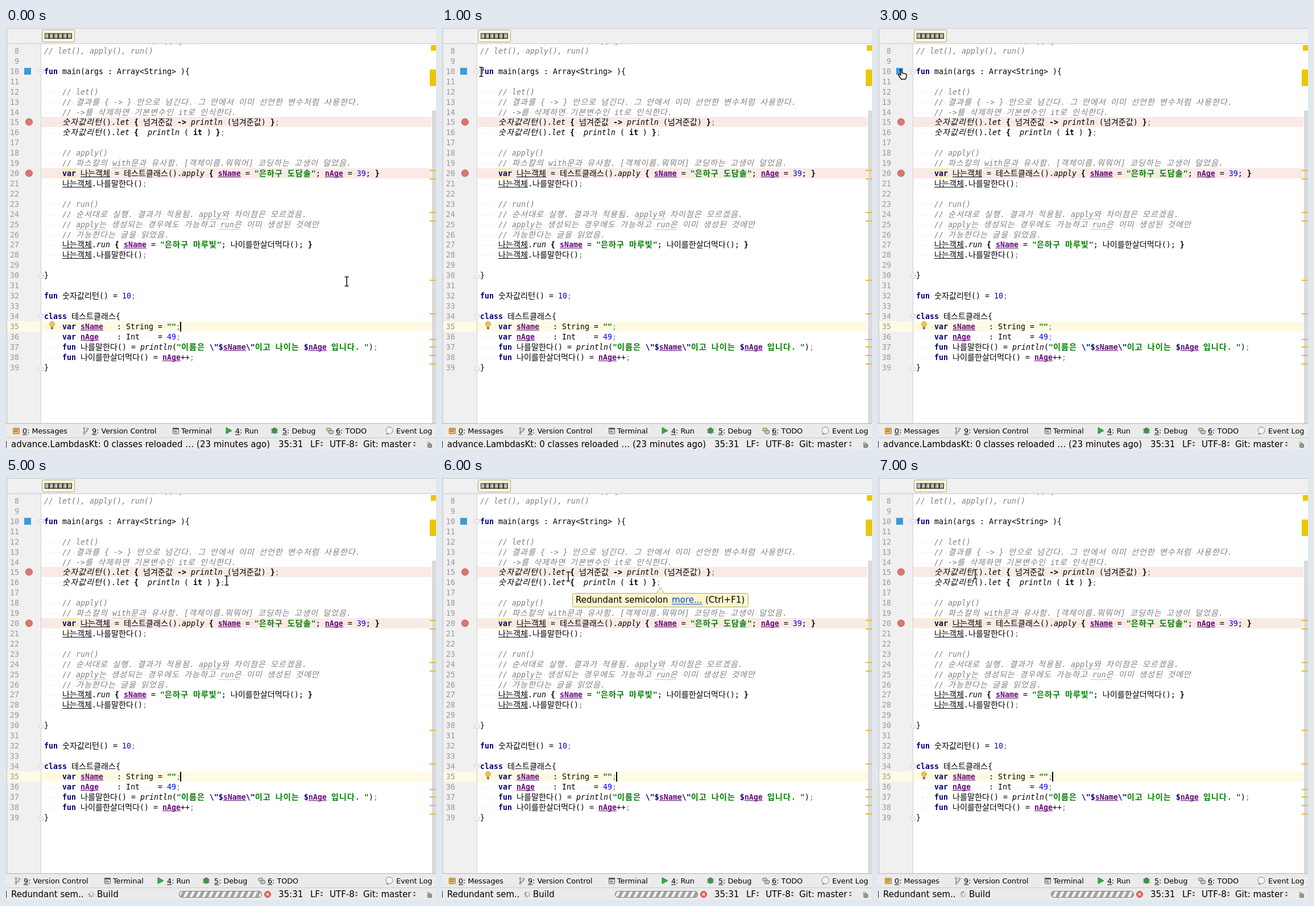
An HTML page with a canvas for the animation above (8 s loop, 756 by 741 pixels).

```html
<!DOCTYPE html>
<html lang="ko">
<head>
<meta charset="utf-8">
<style>
html, body { margin: 0; width: 100%; height: 100%; overflow: hidden; background: #fff; }
canvas { display: block; }
</style>
</head>
<body>
<canvas id="stage" width="756" height="741"></canvas>
<script>
const ctx = document.getElementById('stage').getContext('2d');
const UI = '"DejaVu Sans", sans-serif';
const MONO = '13.29px "DejaVu Sans Mono", monospace';
const HANGUL = '14.13px "Noto Sans CJK KR", "Noto Sans CJK", "Noto Sans CJK JP", sans-serif';

// style key: [colour, font style, underlined]
const STYLES = {
  p: ['#000', ''], k: ['#000080', 'bold'], b: ['#000', 'bold'], c: ['#808080', 'italic'],
  i: ['#000', 'italic'], s: ['#008000', 'bold'], v: ['#660e7a', 'bold', true],
  u: ['#000', '', true], n: ['#0000ff', ''], g: ['#808080', '']
};

// Runs are separated by "|"; the first letter of each run is its style.
const CODE = {
  7: 'c// 함수형 표현 (기본 정리), apply(1)',
  8: 'c// let(), apply(), run()',
  10: 'kfun|p main(args : Array<String> ){',
  12: 'p    |c// let()',
  13: 'p    |c// 결과를 { -> } 안으로 넘긴다. 그 안에서 이미 선언한 변수처럼 사용한다.',
  14: 'p    |c// ->를 삭제하면 기본변수인 it로 인식한다.',
  15: 'p    |i숫자값리턴|p().|ilet |b{ |p넘겨준값 |b-> |iprintln |p(넘겨준값) |b}|g;',
  16: 'p    |i숫자값리턴|p().|ilet |b{  |iprintln |p( |bit|p ) |b}|g;',
  18: 'p    |c// apply()',
  19: 'p    |c// 파스칼의 with문과 유사함. [객체이름.뭐뭐머] 코딩하는 고생이 덜었음.',
  20: 'p    |kvar|p |u나는객체|p = 테스트클래스().|iapply |b{ |vsName|p = |s"은하구 도담솔"|p; |vnAge|p = |n39|p; |b}',
  21: 'p    |u나는객체|p.나를말한다()|g;',
  23: 'p    |c// run()',
  24: 'p    |c// 순서대로 실행. 결과가 적용됨. apply와 차이점은 모르겠음.',
  25: 'p    |c// apply는 생성되는 경우에도 가능하고 run은 이미 생성된 것에만',
  26: 'p    |c// 가능한다는 글을 읽었음.',
  27: 'p    |u나는객체|p.|irun |b{ |vsName|p = |s"은하구 마루빛"|p; 나이를한살더먹다(); |b}',
  28: 'p    |u나는객체|p.나를말한다()|g;',
  30: 'p}',
  32: 'kfun|p 숫자값리턴() = |n10|g;',
  34: 'kclass|p 테스트클래스{',
  35: 'p    |kvar|p |vsName|p   : String = |s""|g;',
  36: 'p    |kvar|p |vnAge|p    : Int    = |n49|g;',
  37: 'p    |kfun|p 나를말한다() = |iprintln|p(|s"이름은 |k\\"$|vsName|k\\"|s이고 나이는 |k$|vnAge|s 입니다. "|p)|g;',
  38: 'p    |kfun|p 나이를한살더먹다() = |vnAge|p++|g;',
  39: 'p}'
};

const baseline = n => Math.round(45 + 17.92 * (n - 8));

function rect(x, y, w, h, fill) {
  ctx.fillStyle = fill;
  ctx.fillRect(x, y, w, h);
}

function path(points, fill, stroke, width = 1) {
  ctx.beginPath();
  points.forEach(([x, y]) => ctx.lineTo(x, y));
  ctx.closePath();
  paint(fill, stroke, width);
}

function paint(fill, stroke, width = 1) {
  if (fill) { ctx.fillStyle = fill; ctx.fill(); }
  if (stroke) { ctx.strokeStyle = stroke; ctx.lineWidth = width; ctx.stroke(); }
}

function circle(x, y, r, fill, stroke, width) {
  ctx.beginPath();
  ctx.arc(x, y, r, 0, 7);
  paint(fill, stroke, width);
}

function box(x, y, w, h, r, fill, stroke) {
  ctx.beginPath();
  ctx.roundRect(x + .5, y + .5, w - 1, h - 1, r);
  paint(fill, stroke);
}

// UI label; mnemonic is the index of an underlined letter.
function label(str, x, y, size = 15, color = '#000', mnemonic = -1) {
  ctx.font = `${size}px ${UI}`;
  ctx.fillStyle = color;
  ctx.fillText(str, x, y);
  if (mnemonic >= 0) {
    const from = ctx.measureText(str.slice(0, mnemonic)).width;
    rect(x + from, y + 1.5, ctx.measureText(str[mnemonic]).width, 1, color);
  }
}

function codeLine(n) {
  const y = baseline(n);
  let x = 67;
  for (const run of CODE[n].split('|')) {
    const [color, style, underlined] = STYLES[run[0]];
    const start = x;
    for (const part of run.slice(1).match(/[가-힣]+|[^가-힣]+/g)) {
      const hangul = /[가-힣]/.test(part);
      ctx.font = `${style} ${hangul ? HANGUL : MONO}`;
      // Bold and slanted Hangul runs one pixel wider per syllable.
      ctx.letterSpacing = hangul && style ? '1px' : '0px';
      ctx.fillStyle = color;
      ctx.fillText(part, x, y);
      if (!hangul) [...part].forEach((ch, i) => {
        if (ch === ' ') rect(Math.round(x + i * 8 + 3), y - 4, 1, 1, '#bdbdbd');
      });
      x += ctx.measureText(part).width;
    }
    if (underlined) rect(start, y + 1, x - start, 1, color);
  }
  ctx.letterSpacing = '0px';
}

function squiggle(x, n, width) {
  ctx.beginPath();
  for (let i = 0; i <= width; i += 2) ctx.lineTo(x + i, baseline(n) + 3 + i / 2 % 2 * 1.5);
  paint(null, '#b5c9a8');
}

function foldMark(n, end) {
  const y = baseline(n) - 4, d = end ? -1 : 1;
  path([[57.5, y - 4 * d], [65.5, y - 4 * d], [65.5, y + d], [61.5, y + 5 * d], [57.5, y + d]], '#fff', '#c4c4c4');
  rect(59.5, y - .5, 4, 1, '#b0b0b0');
}

function playIcon(x, y) {
  path([[x - 4, y - 5.5], [x + 6, y], [x - 4, y + 5.5]], '#2faa4a', '#24913c');
}

function bugIcon(x, y) {
  for (const dy of [-3, 0, 3]) rect(x - 6, y + dy, 12, 1, '#34703c');
  ctx.beginPath();
  ctx.ellipse(x, y, 4, 5, 0, 0, 7);
  paint('#3b9a48', '#2b6c36');
}

function editor(caretOn, bulbOn) {
  rect(0, 0, 756, 741, '#fff');
  rect(0, 28, 61, 667, '#f0f0f0');
  for (const n of [15, 20]) rect(62, baseline(n) - 14, 686, 18, '#faeae6');
  rect(2, 515, 746, 18, '#fffae3');
  rect(99, 246, 24, 18, '#f6ebbc');
  rect(61, 28, 1, 667, '#d0d0d0');
  Object.keys(CODE).forEach(n => codeLine(+n));
  squiggle(187, 19, 60);
  squiggle(338, 24, 54);
  squiggle(123, 25, 54);
  squiggle(374, 25, 38);

  ctx.textAlign = 'right';
  ctx.font = MONO;
  ctx.fillStyle = '#999';
  for (let n = 8; n < 40; n++) ctx.fillText(n, 23, baseline(n));
  ctx.textAlign = 'left';
  foldMark(10);
  foldMark(34);
  foldMark(30, true);
  foldMark(39, true);
  rect(32, 70, 12, 12, '#3b9bdc');
  for (const y of [165, 255]) circle(40.5, y, 6, '#db776f', '#bd5d57');
  if (bulbOn) {
    circle(81, 520, 4.5, '#f6bd4f', '#dba03a');
    rect(79, 525, 4, 4, '#777');
  }
  if (caretOn) rect(306, 516, 2, 17, '#000');

  rect(749, 145, 7, 550, '#dadada');
  rect(747, 30, 9, 10, '#ebc700');
  rect(745, 73, 11, 29, '#ebc700');
  for (const y of [250, 265, 324, 339, 443, 502, 547, 560, 575, 590]) rect(745, y - 1, 11, 2, '#e3bb35');
}

function topBar() {
  rect(0, 0, 756, 28, '#f0f0f0');
  rect(0, 0, 756, 1, '#c4c4c4');
  rect(0, 27, 756, 1, '#c8c8c8');
  box(63, 3, 58, 22, 2, '#fbf8dc', '#a8a38a');
  for (let x = 68; x < 116; x += 8) {
    ctx.strokeStyle = '#222';
    ctx.lineWidth = 1;
    ctx.strokeRect(x + .5, 9.5, 7, 9);
    for (const dx of [2, 5]) for (const dy of [11, 15]) rect(x + dx, dy, 1.5, 2.5, '#333');
  }
}

function toolBar(withMessages) {
  rect(0, 694, 756, 47, '#ebebeb');
  rect(0, 694, 756, 1, '#b4b4b4');
  rect(0, 719, 756, 1, '#c9c9c9');
  const item = (str, x, mnemonic = 0) => label(str, x, 712, 12.75, '#000', mnemonic);
  ctx.save();
  if (withMessages) {
    box(12, 702, 12, 11, 1, '#e8b86a', '#a87b3c');
    rect(14, 705, 8, 1, '#805a28');
    rect(14, 708, 6, 1, '#805a28');
    item('0: Messages', 29);
  } else ctx.translate(-120, 0);
  ctx.beginPath();
  ctx.moveTo(137.5, 704); ctx.lineTo(137.5, 712);
  ctx.moveTo(137.5, 710); ctx.quadraticCurveTo(143.5, 709, 143.5, 704);
  paint(null, '#557a9e', 1.3);
  for (const [x, y] of [[137.5, 703], [137.5, 712], [143.5, 704]]) circle(x, y, 1.6, '#f0f0f0', '#557a9e');
  item('9: Version Control', 151);
  box(293, 702, 11, 11, 1, '#e4e4e4', '#555');
  rect(293, 702, 11, 3, '#555');
  rect(295, 707, 5, 1, '#555');
  rect(295, 709, 6, 1, '#555');
  item('Terminal', 308, -1);
  playIcon(391, 707);
  item('4: Run', 403);
  bugIcon(472, 707);
  item('5: Debug', 486);
  box(563, 702, 9, 6, 2, '#e5c590', '#806a48');
  box(567, 706, 9, 7, 2, '#b9c8d8', '#506478');
  item('6: TODO', 580);
  ctx.restore();
  circle(674, 706.5, 6, '#f4f4f4', '#858585');
  path([[670, 711], [668, 714], [674, 713]], '#858585');
  item('Event Log', 686, -1);
}

function arrows(x) {
  path([[x - 2.5, 729], [x, 726], [x + 2.5, 729]], '#555');
  path([[x - 2.5, 732], [x, 735], [x + 2.5, 732]], '#555');
}

function statusBar(building, step) {
  rect(0, 725, 1, 12, '#222');
  if (building) {
    label('Redundant sem..', 9, 736);
    for (let i = 0; i < 8; i++) {
      const a = (i + step) * Math.PI / 4, c = Math.cos(a), s = Math.sin(a);
      ctx.beginPath();
      ctx.moveTo(150 + 2.5 * c, 731 + 2.5 * s);
      ctx.lineTo(150 + 5.5 * c, 731 + 5.5 * s);
      paint(null, `rgb(0 0 0 / ${.12 + i * .08})`, 1.4);
    }
    label('Build', 160, 736);
    ctx.save();
    box(304, 725, 146, 12, 6, '#f4f4f4', '#888');
    ctx.clip();
    for (let x = 290 + step * 3 % 11; x < 456; x += 11)
      path([[x, 737], [x + 6, 737], [x + 12, 725], [x + 6, 725]], '#a3a3a3');
    ctx.restore();
    box(304, 725, 146, 12, 6, null, '#888');
    circle(460, 731, 5.5, '#e2665c', '#c84f47');
    ctx.beginPath();
    ctx.moveTo(458, 729); ctx.lineTo(462, 733);
    ctx.moveTo(462, 729); ctx.lineTo(458, 733);
    paint(null, '#fff', 1.4);
  } else label('advance.LambdasKt: 0 classes reloaded … (23 minutes ago)', 9, 736);
  label('35:31', 479, 736);
  label('LF', 535, 736);
  arrows(555);
  label('UTF-8', 569, 736);
  arrows(616);
  label('Git: master', 628, 736);
  arrows(718);
  box(741, 730, 8, 7, 1, '#8fa58f', '#666');
  ctx.beginPath();
  ctx.arc(743, 730, 2.5, Math.PI, 0);
  paint(null, '#666');
}

function popup() {
  ctx.save();
  ctx.shadowColor = 'rgba(0,0,0,.45)';
  ctx.shadowBlur = 22;
  ctx.shadowOffsetY = 5;
  rect(41, 76, 396, 70, '#eff0f1');
  ctx.restore();
  box(41, 76, 396, 70, 0, null, '#c6c8ca');
  rect(41, 100, 396, 22, '#3875d7');
  playIcon(51, 88);
  bugIcon(51, 111);
  playIcon(53, 133);
  for (let i = 0; i < 18; i++) if ((i + (i / 3 | 0)) % 2) rect(45 + i % 3 * 2, 127 + (i / 3 | 0) * 2, 2, 2, '#777');
  const run = "Run 'advance.Newstyle_fun...'";
  label(run, 65, 93, 15, '#000', 1);
  label('Ctrl+Shift+F10', 327, 92, 12.75, '#5c5c5c');
  label("Debug 'advance.Newstyle_fun...'", 65, 115, 15, '#fff', 0);
  label(run + ' with Coverage', 65, 138, 15, '#000', run.length + 9);
}

function tooltip() {
  const fill = '#fbf6cb', edge = '#aaa580';
  box(229, 202, 310, 25, 3, fill, edge);
  path([[377, 203], [384, 192], [391, 203]], fill, edge);
  rect(377, 203, 15, 2, fill);
  label('Redundant semicolon', 235, 219);
  label('more...', 404, 219, 15, '#0645e0');
  rect(404, 221, 54, 1, '#0645e0');
  label('(Ctrl+F1)', 463, 219);
}

function iBeam(x, y) {
  for (const [color, width] of [['#fff', 3.5], ['#1a1a1a', 1.6]]) {
    ctx.beginPath();
    ctx.moveTo(x - 3.5, y - 8); ctx.lineTo(x + 3.5, y - 8);
    ctx.moveTo(x, y - 8); ctx.lineTo(x, y + 8);
    ctx.moveTo(x - 3.5, y + 8); ctx.lineTo(x + 3.5, y + 8);
    paint(null, color, width);
  }
}

function hand(x, y) {
  path([[x, y], [x + 2, y], [x + 3, y + 6], [x + 11, y + 8], [x + 11, y + 13], [x + 9, y + 17],
    [x + 2, y + 17], [x - 3, y + 10], [x - 2, y + 8], [x + 1, y + 10]], '#fff', '#111', 1.5);
}

function arrow(x, y) {
  path([[x, y], [x, y + 16], [x + 4, y + 12.5], [x + 6.5, y + 18], [x + 9, y + 17],
    [x + 6.5, y + 11.5], [x + 11, y + 11]], '#111', '#fff', 1.3);
}

// Pointer for each second of the loop.
const POINTERS = [
  [iBeam, 599, 445], [iBeam, 69, 77], [iBeam, 185, 75], [hand, 39, 73],
  [arrow, 66, 105], [iBeam, 388, 180], [iBeam, 222, 173], [iBeam, 171, 169]
];

function draw(now) {
  const step = Math.floor(now / 1000) % 8;
  const building = step >= 5;
  const launching = step === 5;
  editor(step === 0 || building, !launching);
  topBar();
  toolBar(!launching);
  statusBar(building, step);
  rect(1, 0, 1, 695, '#bdbdbd');
  if (step === 4) popup();
  if (step === 6) tooltip();
  const [pointer, x, y] = POINTERS[step];
  pointer(x, y);
}

const begin = performance.now();
function tick() {
  draw(performance.now() - begin);
  requestAnimationFrame(tick);
}
tick();
</script>
</body>
</html>
```
